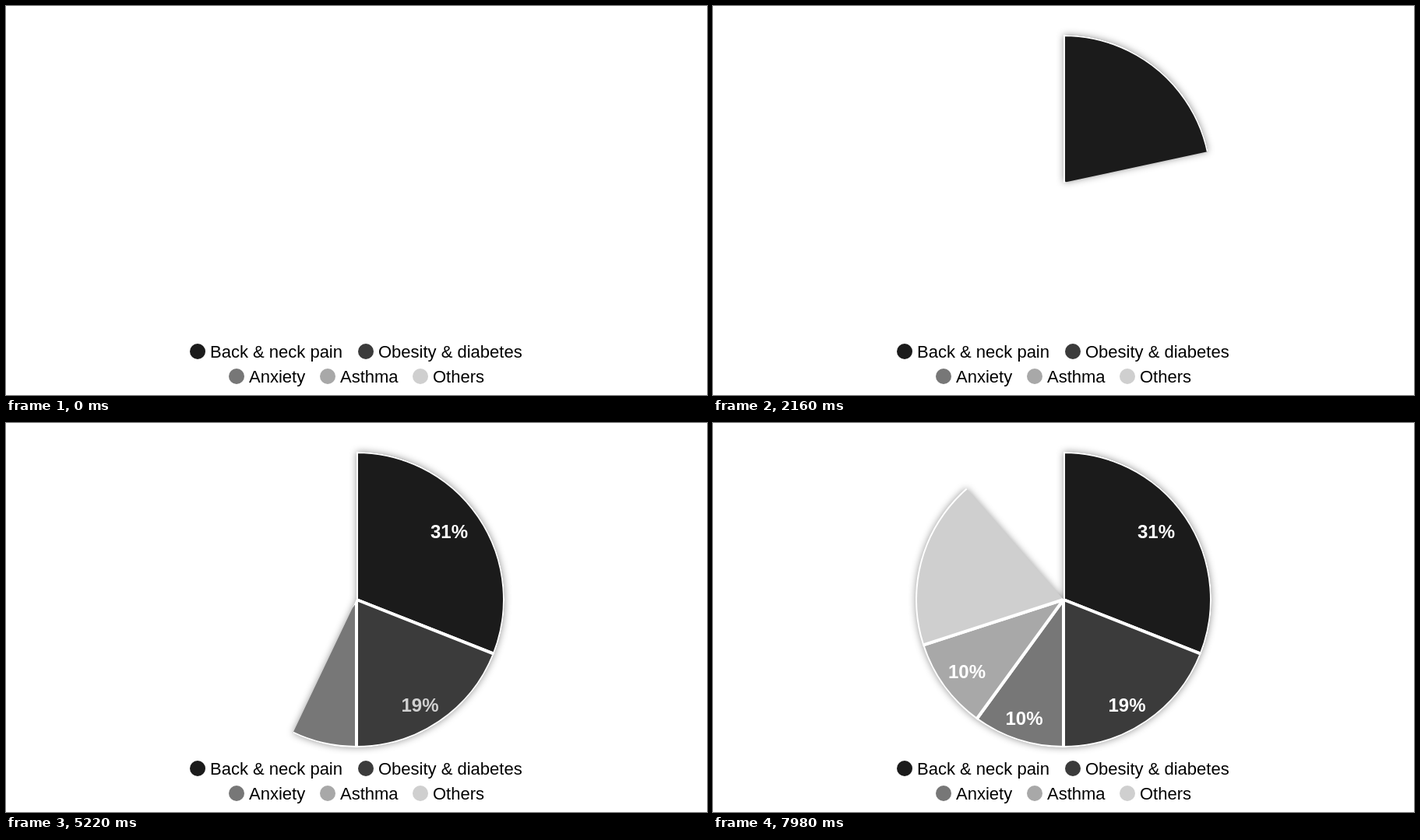
Recreate the animation shown at these times as an HTML page. Size 900 px wide and 500 px high, loop 8 s.

```html
<!DOCTYPE html>
<html lang="en">
<head>
<meta charset="utf-8">
<title>Pie chart</title>
<style>
  html, body { margin: 0; width: 100%; height: 100%; overflow: hidden; background: #fff; }
  svg { display: block; width: 900px; height: 500px; }
  text { font-family: "Liberation Sans", Arial, sans-serif; }
  #pie { filter: drop-shadow(0 0 5px rgba(0, 0, 0, .4)); }
  #slices path { stroke: #fff; stroke-width: 4; stroke-linejoin: round; }
  #labels text { font-size: 24px; font-weight: bold; fill: #fff; text-anchor: middle; }
  #legend text { font-size: 22px; fill: #000; }
</style>
</head>
<body>
<svg viewBox="0 0 900 500">
  <defs><clipPath id="sweep"><path id="wedge"/></clipPath></defs>
  <g id="pie"><g id="slices" clip-path="url(#sweep)"></g></g>
  <g id="labels"></g>
  <g id="legend"></g>
</svg>
<script>
const CX = 450, CY = 227, R = 190;
const LOOP = 8000, STEP = 30, FADE = 800;

const slices = [
  { name: 'Back & neck pain',   share: 31, color: '#1b1b1b', label: [569, 147.5],   key: [246, 444] },
  { name: 'Obesity & diabetes', share: 19, color: '#3b3b3b', label: [531.5, 370.5], key: [462, 444] },
  { name: 'Anxiety',            share: 10, color: '#777777', label: [399.5, 387.5], key: [296, 476] },
  { name: 'Asthma',             share: 10, color: '#a8a8a8', label: [326, 327.5],   key: [413, 476] },
  { name: 'Others',             share: 30, color: '#cfcfcf', key: [532, 476] }
];

// Sweep pace: [time in ms, angle in degrees]
const pace = [[255, 0], [1410, 46.7], [3180, 120.2], [4410, 171.8], [5940, 235.4], [8000, 319.7]];

const $ = id => document.getElementById(id);

function add(parent, tag, attrs, text) {
  const el = document.createElementNS('http://www.w3.org/2000/svg', tag);
  for (const k in attrs) el.setAttribute(k, attrs[k]);
  if (text) el.textContent = text;
  return $(parent).appendChild(el);
}

function point(deg) {
  const a = deg * Math.PI / 180;
  return (CX + R * Math.sin(a)).toFixed(3) + ' ' + (CY - R * Math.cos(a)).toFixed(3);
}

function sector(from, to) {
  const large = to - from > 180 ? 1 : 0;
  return `M${CX} ${CY}L${point(from)}A${R} ${R} 0 ${large} 1 ${point(to)}Z`;
}

// Piecewise linear lookup: column `a` to column `b`
function lookup(v, a, b) {
  if (v <= pace[0][a]) return pace[0][b];
  for (let i = 1; i < pace.length; i++) {
    const p = pace[i - 1], q = pace[i];
    if (v <= q[a]) return p[b] + (q[b] - p[b]) * (v - p[a]) / (q[a] - p[a]);
  }
  return pace[pace.length - 1][b];
}

let angle = 0;
for (const s of slices) {
  const end = angle + s.share * 3.6;
  add('slices', 'path', { d: sector(angle, end), fill: s.color });
  if (s.label) {
    s.el = add('labels', 'text', { x: s.label[0], y: s.label[1] }, s.share + '%');
    s.shown = lookup(end, 1, 0);
  }
  const [x, y] = s.key;
  add('legend', 'circle', { cx: x, cy: y, r: 10, fill: s.color });
  add('legend', 'text', { x: x + 16, y: y + 8 }, s.name);
  angle = end;
}

function draw(t) {
  const a = lookup(t, 0, 1);
  $('slices').style.display = a > 0 ? '' : 'none';
  $('wedge').setAttribute('d', sector(0, a));
  for (const s of slices) {
    if (s.el) s.el.setAttribute('opacity', Math.max(0, Math.min(1, (t - s.shown) / FADE)));
  }
}

const start = performance.now();
function tick() {
  const t = (performance.now() - start) % LOOP;
  draw(Math.floor(t / STEP) * STEP);
  requestAnimationFrame(tick);
}
tick();
</script>
</body>
</html>
```
